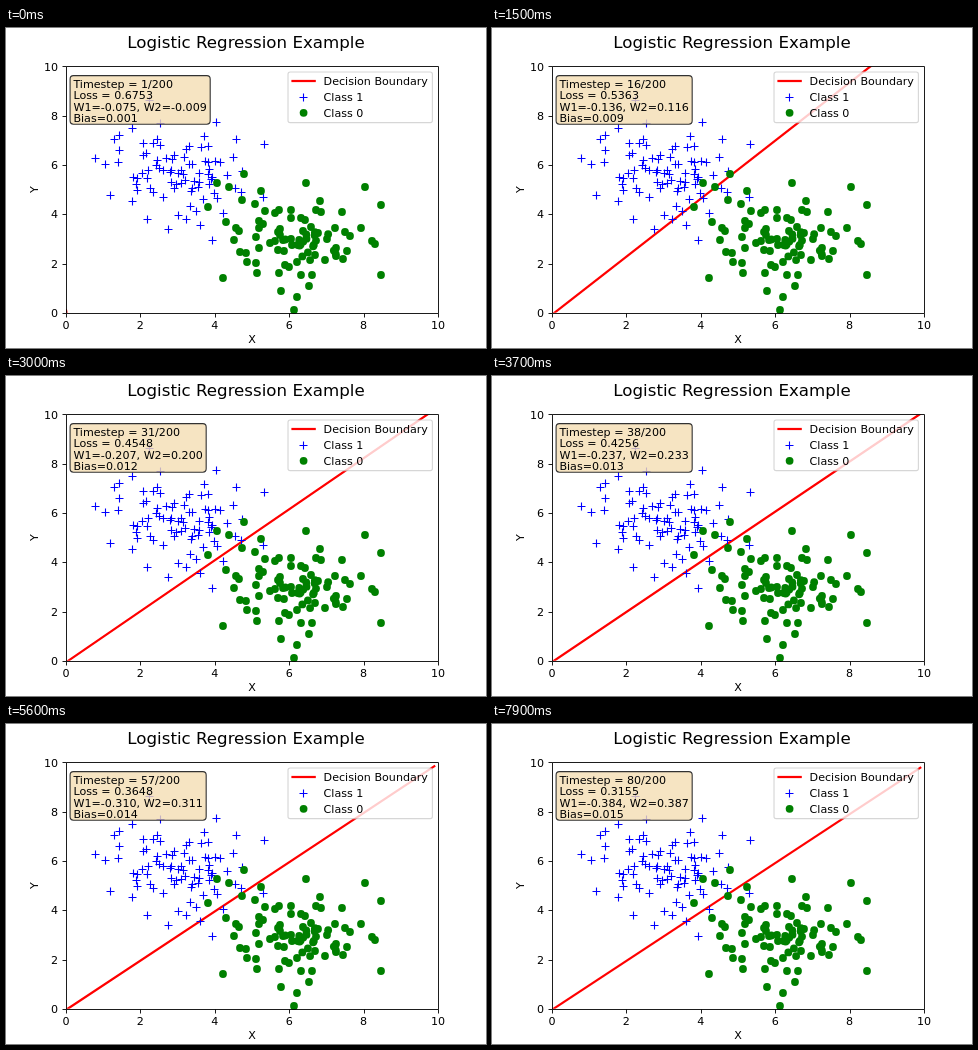
Recreate the animation shown at these times as an HTML page. Size 480 px wide and 320 px high, loop 8000 ms.

```html
<!DOCTYPE html>
<html lang="en">
<head>
<meta charset="utf-8">
<title>Logistic Regression Example</title>
<style>
  html, body { margin: 0; width: 100%; height: 100%; overflow: hidden; background: #fff; }
  svg { display: block; width: 480px; height: 320px; }
  text { font: 11.11px "DejaVu Sans", sans-serif; fill: #000; white-space: pre; }
  .title { font-size: 16.67px; }
  .mid { text-anchor: middle; }
  .end { text-anchor: end; }
  .axis { fill: none; stroke: #000; stroke-width: .89; }
  .plus { fill: none; stroke: #00f; stroke-width: 1.1; }
  .dot { fill: #008000; }
  .boundary { stroke: #f00; stroke-width: 2.22; stroke-linecap: square; }
</style>
</head>
<body>
<svg id="stage" viewBox="0 0 480 320">
  <clipPath id="plot"><rect x="60" y="38.4" width="372" height="246.4"/></clipPath>
</svg>
<script>
const LOOP = 8000, STEP = 100;
const stage = document.getElementById('stage');
const px = x => 60 + 37.2 * x;
const py = y => 284.8 - 24.64 * y;
const snap = v => Math.floor(v + .5) + .5;

function add(tag, attrs, text = '') {
  const el = document.createElementNS('http://www.w3.org/2000/svg', tag);
  for (const key in attrs) el.setAttribute(key, attrs[key]);
  el.textContent = text;
  return stage.appendChild(el);
}
const label = (x, y, text, cls = '') => add('text', { x, y, class: cls }, text);
const plus = (x, y) => add('path', {
  class: 'plus', d: `M${snap(x) - 4} ${snap(y)}h8M${snap(x)} ${snap(y) - 4}v8`
});
const dot = (cx, cy) => add('circle', { class: 'dot', cx, cy, r: 3.9 });

// Scatter data in stage pixels: x, y pairs
const class1 = [
  89,130, 99,136, 112,134, 104,167, 108,111, 113,107, 113,122, 126,100, 126,173, 127,149,
  131,150, 130,156, 131,162, 137,115, 137,127, 140,125, 136,145, 141,150, 142,142, 141,191,
  144,160, 147,164, 147,115, 151,111, 154,117, 154,95, 143,72, 150,137, 153,140, 157,142,
  157,169, 162,201, 164,144, 165,154, 168,160, 166,131, 168,127, 172,145, 172,187, 175,155,
  178,129, 180,191, 183,118, 183,136, 186,136, 184,178, 186,160, 190,183, 188,153, 192,159,
  194,197, 195,119, 198,108, 202,118, 199,133, 193,145, 197,171, 202,146, 203,156, 205,151,
  208,165, 209,133, 214,134, 210,94, 206,212, 217,185, 221,147, 227,129, 230,111, 229,160,
  235,164, 236,143, 258,116, 257,169
];
const class0 = [
  238,146, 211,155, 223,159, 202,179, 236,172, 220,194, 217,250, 255,163, 249,176, 230,200,
  233,203, 228,212, 234,224, 240,225, 241,234, 250,235, 251,245, 250,209, 253,193, 259,183,
  257,196, 253,200, 253,220, 264,215, 269,213, 269,185, 273,182, 274,201, 274,207, 277,212,
  272,222, 278,223, 273,245, 279,237, 283,239, 275,263, 285,182, 285,190, 285,211, 286,217,
  291,234, 288,282, 291,269, 300,155, 295,190, 299,192, 297,203, 305,199, 303,258, 306,247,
  295,247, 310,182, 315,184, 314,173, 312,205, 309,227, 321,211, 319,232, 329,200, 330,220,
  330,228, 337,231, 336,184, 339,204, 344,208, 341,223, 355,200, 359,159, 375,177, 366,213,
  369,216, 375,247
];

let seed = 7;
const rand = () => (seed = (seed * 16807) % 2147483647) / 2147483647;
const spread = () => rand() + rand() + rand() - 1.5;

// Crowded middle of a class
function crowd(mark, n, x, y, w, h) {
  while (n--) mark(x + w * spread(), y + h * spread());
}
function scatter(mark, pts) {
  for (let i = 0; i < pts.length; i += 2) mark(pts[i], pts[i + 1]);
}

// Training log: step, loss, w1, w2, bias
const log = [
  [1, .6753, -.075, -.009, .001],
  [10, .5815, -.109, .073, .0067],
  [22, .5003, -.165, .152, .0102],
  [31, .4548, -.207, .2, .0118],
  [46, .3972, -.27, .268, .0134],
  [69, .3368, -.35, .352, .0148],
  [80, .3155, -.384, .387, .0151]
];
const last = log.length - 1;
const gap = i => log[i + 1][0] - log[i][0];
const rate = (i, k) => (log[i + 1][k] - log[i][k]) / gap(i);

function slope(i, k) {
  if (i === 0) return 2 * rate(0, k) - slope(1, k);
  if (i === last) return 2 * rate(last - 1, k) - slope(last - 1, k);
  const a = gap(i - 1), b = gap(i);
  return (b * rate(i - 1, k) + a * rate(i, k)) / (a + b);
}

// Cubic Hermite through the log
function value(n, k) {
  let i = 0;
  while (i < last - 1 && n >= log[i + 1][0]) i++;
  const h = gap(i), u = (n - log[i][0]) / h, v = 1 - u;
  return log[i][k] * v * v * (1 + 2 * u) + log[i + 1][k] * u * u * (3 - 2 * u)
    + h * u * v * (slope(i, k) * v - slope(i + 1, k) * u);
}

// Plot
const group = add('g', { 'clip-path': 'url(#plot)' });
const boundary = group.appendChild(add('line', { class: 'boundary' }));
scatter(plus, class1);
crowd(plus, 14, 178, 143, 44, 30);
scatter(dot, class0);
crowd(dot, 20, 300, 215, 24, 17);

// Axes
add('path', { class: 'axis', d: 'M60.5 38.5H432.5V285.5H60.5Z' });
for (let v = 0; v <= 10; v += 2) {
  const x = snap(px(v)), y = snap(py(v));
  add('path', { class: 'axis', d: `M${x} 285.5v4M60.5 ${y}h-4` });
  label(px(v), 300.7, v, 'mid');
  label(52.2, py(v) + 4.2, v, 'end');
}
label(246, 315.3, 'X', 'mid');
label(0, 0, 'Y', 'mid').setAttribute('transform', 'translate(32 161.6) rotate(-90)');
label(240, 20, 'Logistic Regression Example', 'title mid');

// Readout
const box = add('rect', {
  x: 64.1, y: 47.6, height: 48.6, rx: 3.33,
  fill: '#f5deb3', stroke: '#000', 'stroke-width': 1.11, opacity: .8
});
const lines = [59.8, 71.3, 82.9, 94.4].map(y => label(67.4, y, ''));

// Legend
add('rect', {
  x: 282, y: 44, width: 144.4, height: 50.6, rx: 2.2,
  fill: '#fff', stroke: '#ccc', 'stroke-width': 1.11, opacity: .8
});
add('line', { class: 'boundary', x1: 286.5, x2: 308.7, y1: 53, y2: 53 });
plus(297, 69);
dot(297.6, 84.8);
['Decision Boundary', 'Class 1', 'Class 0'].forEach((s, i) => label(317.6, 57 + 15.9 * i, s));

function show(n) {
  const [loss, w1, w2, bias] = [1, 2, 3, 4].map(k => value(n, k));
  const at = x => py(-(w1 * x + bias) / w2);
  const ends = { x1: px(0), y1: at(0), x2: px(9.9), y2: at(9.9) };
  for (const key in ends) boundary.setAttribute(key, ends[key]);
  [
    `Timestep = ${n}/200`,
    `Loss = ${loss.toFixed(4)}`,
    `W1=${w1.toFixed(3)}, W2=${w2.toFixed(3)}`,
    `Bias=${bias.toFixed(3)}`
  ].forEach((s, i) => { lines[i].textContent = s; });
  const width = Math.max(...lines.map(l => l.getComputedTextLength()));
  box.setAttribute('width', width + 6.67);
}

let shown = 0;
function tick() {
  const n = Math.floor(performance.now() % LOOP / STEP) + 1;
  if (n !== shown) show(shown = n);
  requestAnimationFrame(tick);
}
tick();
</script>
</body>
</html>
```
